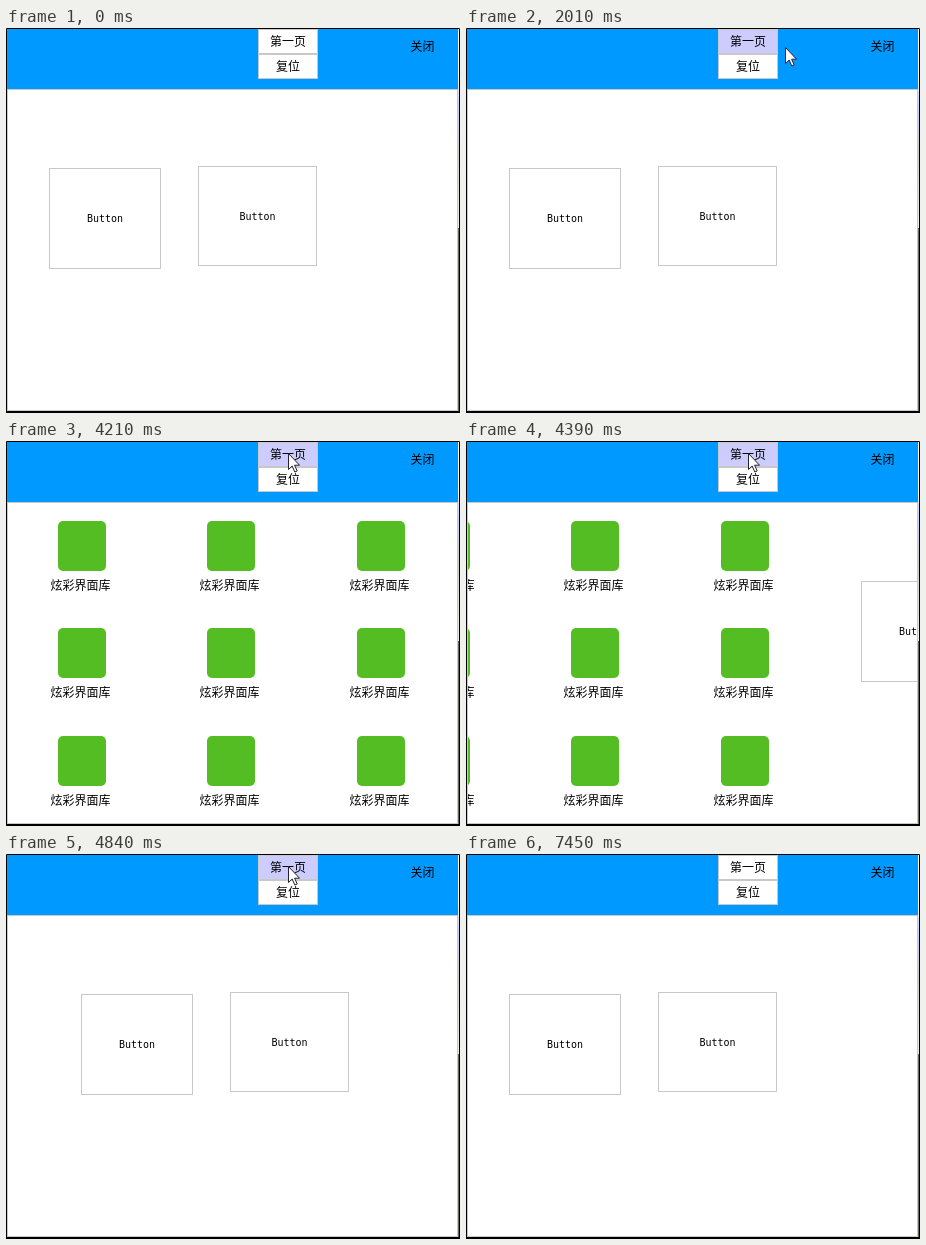
Recreate the animation shown at these times as an HTML page. Size 454 by 385 pixels, loop 8040 ms.

```html
<!DOCTYPE html>
<html lang="zh">
<head>
<meta charset="utf-8">
<style>
html, body { margin: 0; width: 100%; height: 100%; overflow: hidden; background: #fff; }
svg { display: block; }
text { font: 12px "Noto Sans CJK SC", "Noto Sans CJK", sans-serif; white-space: pre; }
text.mono { font: 10px "DejaVu Sans Mono", monospace; }
.box { fill: #fff; stroke: #c8c8c8; }
.hover { fill: #ccf; }
.down { fill: #bbf; }
</style>
</head>
<body>
<svg width="454" height="385" viewBox="0 0 454 385">
  <clipPath id="view"><rect x="2" y="62" width="449" height="320"/></clipPath>
  <linearGradient id="desk" x2="0" y2="1">
    <stop offset=".12" stop-color="#fff"/>
    <stop offset=".2" stop-color="#ccf"/>
    <stop offset=".33" stop-color="#ccc"/>
    <stop offset=".52" stop-color="#eee"/>
    <stop offset=".52" stop-color="#666"/>
  </linearGradient>
  <rect x="452" width="2" height="384" fill="url(#desk)"/>
  <rect x="1" y="1" width="451" height="60" fill="#09f"/>
  <rect class="box" x="1.5" y="61.5" width="450" height="321"/>
  <g clip-path="url(#view)">
    <g id="icons"></g>
    <g id="buttons"></g>
  </g>
  <rect class="box menu" x="252.5" y="1.5" width="59" height="24"/>
  <rect class="box menu" x="252.5" y="26.5" width="59" height="24"/>
  <text x="264" y="18">第一页</text>
  <text x="270" y="43">复位</text>
  <text x="404.5" y="23">关闭</text>
  <path id="cursor" d="M.5.5V16.5L4.2 13 6.8 19 9.2 18 6.6 12.2H11.5Z" fill="#fff" stroke="#223"/>
  <path d="M.5.5H453.5V384H.5ZM0 383.5H454" fill="none" stroke="#000"/>
  <path d="M0 384.5H454" stroke="#000"/>
</svg>
<script>
const LOOP = 8040, PAGE = 448;
const $ = id => document.getElementById(id);
const menus = document.querySelectorAll('.menu');

for (let i = 0; i < 9; i++) {
  const x = Math.round(51.6 + 149.5 * (i % 3));
  const y = Math.round(79.8 + 107.5 * Math.floor(i / 3));
  $('icons').innerHTML += `<rect x="${x}" y="${y}" width="48" height="50" rx="5" fill="#55bd24"/>
    <text x="${x - 7.5}" y="${y + 69}">炫彩界面库</text>`;
}

function addButton(x, y, w, h) {
  $('buttons').innerHTML += `<rect class="box" x="${x + .5}" y="${y + .5}" width="${w}" height="${h}"/>
    <text class="mono" x="${x + w / 2 + .5}" y="${y + h / 2 + 4}" text-anchor="middle">Button</text>`;
}
addButton(43, 140, 111, 100);
addButton(192, 138, 118, 99);

// Ease-out progress from 0 to 1 between two times
function ease(t, start, end) {
  const u = Math.min(1, Math.max(0, (t - start) / (end - start)));
  return 1 - (1 - u) ** 2.1;
}

// The first click shows the icons and slides them off; the second starts over
function pageShift(t) {
  if (t < 3490) return PAGE;
  const start = t < 4210 ? 3890 : 4310;
  return Math.round(PAGE * ease(t, start, start + 740));
}

// Pointer moves: start, end, x, y
const moves = [
  [380, 770, 282, 12], [1978, 2130, 374, 29], [2350, 2440, 375, 31],
  [3060, 3450, 282, 12], [5830, 5950, 282, 26], [7060, 7450, 458, 28]
];

function pointer(t) {
  let x = 407, y = 42;
  for (const [start, end, toX, toY] of moves) {
    const u = ease(t, start, end);
    x += (toX - x) * u;
    y += (toY - y) * u;
  }
  return [Math.round(x), Math.round(y)];
}

function draw() {
  const t = performance.now() % LOOP;
  const shift = pageShift(Math.floor((t - 10) / 30) * 30 + 10);
  $('icons').setAttribute('transform', `translate(${-shift})`);
  $('buttons').setAttribute('transform', `translate(${PAGE - shift})`);

  $('cursor').setAttribute('transform', `translate(${pointer(t)})`);
  $('cursor').style.display = t >= 100 && t < 7450 ? '' : 'none';

  // The highlight trails the pointer slightly
  const [x, y] = pointer(t - 30);
  menus.forEach((menu, i) => {
    const top = 1 + 25 * i;
    const over = x >= 252 && x < 312 && y >= top && y < top + 25;
    menu.classList.toggle('hover', over);
    menu.classList.toggle('down', over && t >= 1110 && t < 1200);
  });
  requestAnimationFrame(draw);
}
draw();
</script>
</body>
</html>
```
